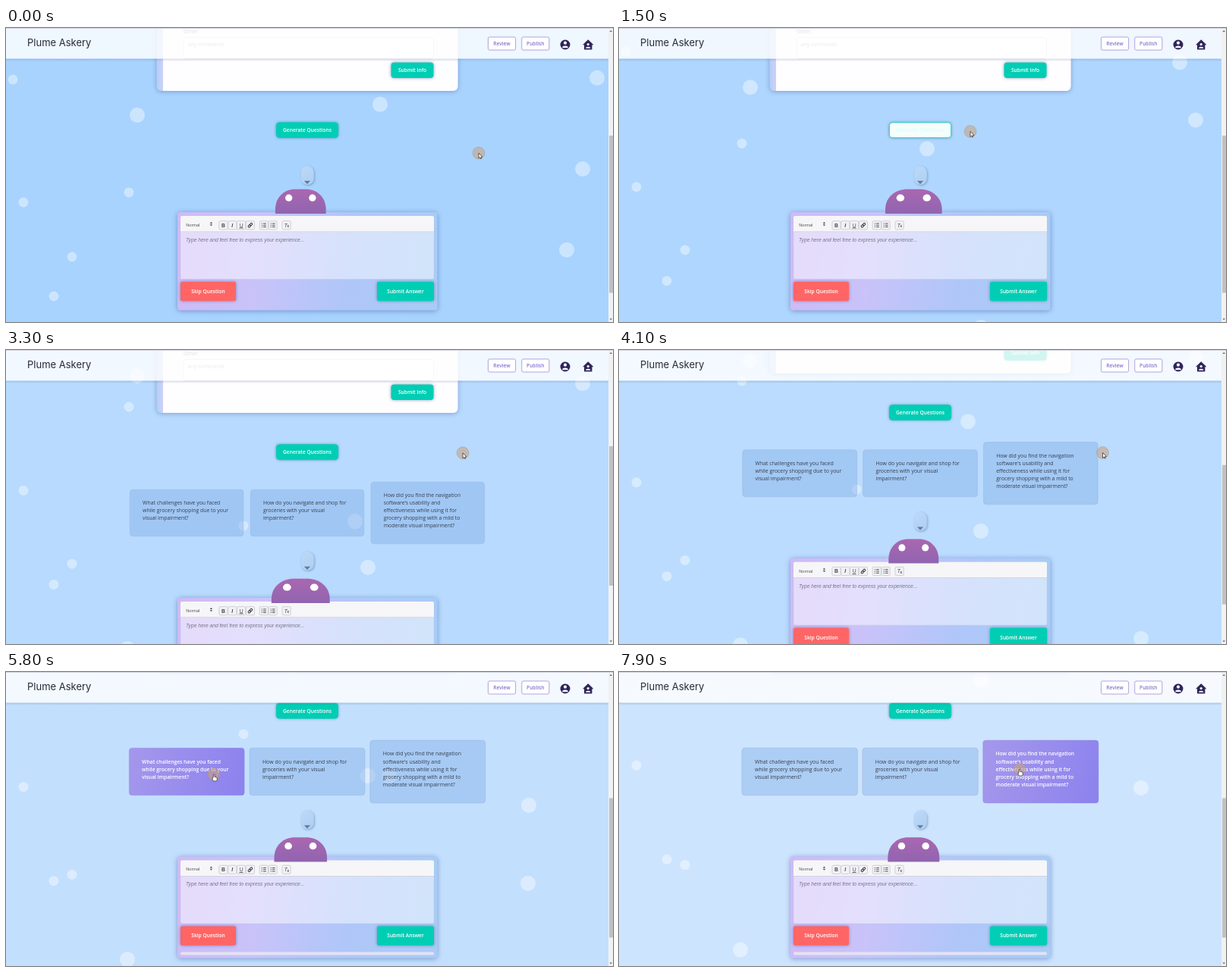
An HTML page with a canvas that plays this animation: 800 by 388 pixels, repeating every 8000 ms.

```html
<!DOCTYPE html>
<html lang="en">
<head>
<meta charset="utf-8">
<title>Survey page</title>
<style>
html, body { margin: 0; width: 100%; height: 100%; overflow: hidden; background: #b5d7fd; }
canvas { display: block; width: 800px; height: 388px; }
</style>
</head>
<body>
<canvas id="stage" width="800" height="388"></canvas>
<script>
const c = document.getElementById('stage').getContext('2d');
const LOOP = 8000, CLICK = 1000, ASK = 2600, SHIFT = 83.5, MID = 397;
const UI = '"Open Sans", "Noto Sans", sans-serif';
const ARIAL = '"Liberation Sans", Arial, sans-serif';
const TEAL = '#00ceb4', RED = '#ff6565', NAVY = '#30245a', PALE = '#f4f7fe', INK = '#444';

const clamp = v => Math.max(0, Math.min(1, v));
const span = (t, a, b) => {
  const v = clamp((t - a) / (b - a));
  return v * v * (3 - 2 * v);
};

// bubbles rise in layers, each with its own speed in px per second
const layers = [
  { speed: 165, spots: [[493, 101], [779, 66], [739, 293], [406, 407], [460, 771], [376, 950], [505, 1095], [689, 1133], [607, 1421]] },
  { speed: 60, spots: [[313, 430], [477, 485], [688, 627]] },
  { speed: 43, spots: [[760, 186], [162, 217]] },
  { speed: 24.5, spots: [[9, 68], [173, 115]] },
  { speed: 13.5, spots: [[23, 230], [63, 354]] },
  { speed: 6, spots: [[87, 302], [160, 414]] }
];
// the right half of the stage has the larger bubbles
const radius = x => x < 165 && x !== 160 || x === 313 ? 6.5 : 10;

// the pointer reaches each stop at the given time, after a glide of fixed length
const GLIDE = 600;
const stops = [
  [850, 416, 136], [1450, 463, 136.5], [3100, 589.5, 136], [3700, 637.5, 135.5],
  [5500, 274, 135], [6600, 392, 129], [7650, 528, 128]
];

const questions = [
  ['What challenges have you faced', 'while grocery shopping due to your', 'visual impairment?'],
  ['How do you navigate and shop for', 'groceries with your visual', 'impairment?'],
  ['How did you find the navigation', "software's usability and", 'effectiveness while using it for', 'grocery shopping with a mild to', 'moderate visual impairment?']
].map((lines, i) => ({ lines, x: MID + (i - 1) * 158.8, y: 215, w: 152.6, h: 32 + lines.length * 10.25 }));

function pointer(t) {
  let x = 623, y = 165;
  for (const [end, sx, sy] of stops) {
    const k = span(t, end - GLIDE, end);
    x += (sx - x) * k;
    y += (sy - y) * k;
  }
  return { x, y };
}
const scrollAt = t => SHIFT * span(t, 3750, 4350);

function inside(q, t) {
  if (t < ASK) return false;
  const p = pointer(t);
  return Math.abs(p.x - q.x) < q.w / 2 && Math.abs(p.y + scrollAt(t) - q.y) < q.h / 2;
}
// share of the last 200 ms spent over the card
function hover(q, t) {
  let n = 0;
  for (let i = 0; i < 10; i++) n += inside(q, t - i * 20);
  return n / 10;
}

function shadow(color, blur, x = 0, y = 0) {
  c.shadowColor = color;
  c.shadowBlur = blur;
  c.shadowOffsetX = x;
  c.shadowOffsetY = y;
}
const noShadow = () => shadow('transparent', 0);

function stroke(color, w) {
  c.strokeStyle = color;
  c.lineWidth = w;
  c.stroke();
}
function box(x, y, w, h, r, fill, edge, lw = .8) {
  c.beginPath();
  c.roundRect(x, y, w, h, r);
  if (fill) { c.fillStyle = fill; c.fill(); }
  noShadow();
  if (edge) stroke(edge, lw);
}
function oval(x, y, rx, ry, fill, from = 0) {
  c.beginPath();
  c.ellipse(x, y, rx, ry, 0, from, Math.PI * 2);
  c.fillStyle = fill;
  c.fill();
}
function triangle(x, y, half, h, fill) {
  c.beginPath();
  c.moveTo(x - half, y);
  c.lineTo(x + half, y);
  c.lineTo(x, y + h);
  c.fillStyle = fill;
  c.fill();
}
function rule(x, y, w, color, lw = .9) {
  c.fillStyle = color;
  c.fillRect(x, y - lw / 2, w, lw);
}
function text(s, x, y, font, color, align = 'left') {
  c.font = font;
  c.fillStyle = color;
  c.textAlign = align;
  c.fillText(s, x, y);
}
function ramp(x0, y0, x1, y1, ...colors) {
  const g = c.createLinearGradient(x0, y0, x1, y1);
  colors.forEach((v, i) => g.addColorStop(i / (colors.length - 1), v));
  return g;
}
function button(label, x, y, w, h, fill, r = 4, ink = '#fff', edge) {
  shadow('rgba(40,70,120,.5)', 4);
  box(x, y, w, h, r, fill, edge);
  text(label, x + w / 2, y + h / 2 + 2.3, '600 6.65px ' + UI, ink, 'center');
}

function background(t) {
  const k = t / LOOP;
  c.fillStyle = `rgb(${168 + 37 * k},${211 + 17 * k},254)`;
  c.fillRect(0, 0, 800, 388);
  for (const { speed, spots } of layers)
    for (const [x, y] of spots)
      oval(x, y - speed * t / 1000, radius(x), radius(x), 'rgba(255,255,255,.42)');
}

function infoCard(s) {
  shadow('rgba(70,100,170,.5)', 6, 0, 1);
  box(198.5, -20 - s, 397, 103, 6, ramp(198, 0, 208, 0, '#b4cdf6', '#cfd2f8'));
  box(207, -20 - s, 388.5, 103, [0, 6, 6, 0], '#fefdff');
  text('Other', 234, 7 - s, '7px ' + UI, '#555');
  box(234, 12.5 - s, 329.5, 27.5, 3, '#fefefe', '#c9c9d2');
  text('any comments', 239.5, 23.5 - s, '7px ' + UI, '#8a8a92');
  button('Submit Info', 507.5, 45.5 - s, 56, 20.5, TEAL);
}

function generate(t, s) {
  const busy = span(t, CLICK, CLICK + 300) * (1 - span(t, ASK, ASK + 250));
  const white = `rgb(${245 * busy},${206 + 47 * busy},${180 + 73 * busy})`;
  const ink = `rgb(${255 - 40 * busy},255,${255 - 8 * busy})`;
  button('Generate Questions', 356.3, 124.8 - s, 81.4, 20, white, 4, ink, TEAL);
}

function card(q, t, s) {
  const { w, h } = q, over = hover(q, t), shown = clamp((t - ASK) / 300);
  const scale = 1 - .02 * Math.exp(-(t - 3300) / 1500);
  const mix = a => a + (255 - a) * over;
  c.save();
  c.translate(q.x, q.y - s);
  c.scale(scale, scale);
  c.globalAlpha = shown;
  box(-w / 2, -h / 2, w, h, 4, 'rgba(132,175,231,.45)', 'rgba(150,165,205,.4)');
  c.globalAlpha = shown * over;
  box(-w / 2, -h / 2, w, h, 4, ramp(-w / 2, 0, w / 2, h / 2, '#a396ec', '#8c82ee'));
  c.globalAlpha = shown;
  q.lines.forEach((l, i) => text(l, 17 - w / 2, 20.5 - h / 2 + i * 10.25,
    (over > .5 ? '600 6.75px ' : '7px ') + UI, `rgb(${mix(55)},${mix(62)},${mix(78)})`));
  c.restore();
}

function toolbar(y) {
  const my = y + 12.3, step = 11.8;
  const tool = x => box(x - 5.6, my - 5.6, 11.2, 11.2, 1.5, '#f2f2f6', '#c6c6d0');
  box(230, y, 334, 21, [2, 2, 0, 0], '#f6f6f8');
  rule(230, y + 21, 334, '#cfcfd8');
  text('Normal', 237.3, my + 1.5, '5.6px ' + ARIAL, '#555');
  triangle(270.4, my - 2.2, 1.7, -2, INK);
  triangle(270.4, my - 1, 1.7, 2, INK);
  ['bold', 'italic bold', ''].forEach((style, i) => {
    tool(286.5 + i * step);
    text('BIU'[i], 286.5 + i * step, my + 2.4, style + ' 6.8px ' + ARIAL, INK, 'center');
  });
  rule(307.5, my + 3.6, 5, INK);
  tool(321.9);
  c.save();
  c.translate(321.9, my);
  c.rotate(-Math.PI / 4);
  for (const x of [-3.4, -.2]) box(x, -1.3, 3.6, 2.6, 1.3, null, INK, 1.1);
  c.restore();
  for (const x of [339.8, 339.8 + step]) {
    tool(x);
    for (const d of [-2.3, 0, 2.3]) {
      rule(x - 3, my + d, 1.2, INK);
      rule(x - .8, my + d, 3.8, INK);
    }
  }
  tool(369.6);
  text('T', 368.8, my + 2.3, 'italic 6.6px ' + ARIAL, INK, 'center');
  text('x', 371.8, my + 3, 'bold 4.5px ' + ARIAL, INK, 'center');
}

function panel(y, asked) {
  shadow('rgba(60,90,165,.55)', 7, 0, 1);
  box(226, y, 342.5, asked ? 134 : 129.5, 4,
    ramp(226, y, 568, y + 50, '#cfbaf6', '#c8c3f9', '#b0c6f9', '#a8ccf5'));
  toolbar(y + 5);
  box(230, y + 26, 334, 62.5, [0, 0, 2, 2], 'rgba(255,255,255,.47)', 'rgba(190,195,225,.4)');
  text('Type here and feel free to express your experience...', 237, y + 38.8, 'italic 6.7px ' + ARIAL, '#75758a');
  button('Skip Question', 230, y + 92, 73, 25.3, RED, 2);
  button('Submit Answer', 489, y + 92, 75, 25.3, TEAL, 2);
  if (asked) box(230, y + 126, 334, 4, 2, '#e4e2f3');
}

function robot(t, y) {
  const half = 35.75 - 2.85 * Math.cos(Math.PI * (t / 1000 - .19));
  c.save();
  c.translate(388.3, y);
  c.scale(half / 33, 1);
  c.beginPath();
  c.moveTo(-33, 32.2);
  c.lineTo(-33, 27);
  c.bezierCurveTo(-33, 10, -21, 0, -7, 0);
  c.lineTo(7, 0);
  c.bezierCurveTo(21, 0, 33, 10, 33, 27);
  c.lineTo(33, 32.2);
  c.fillStyle = ramp(0, 0, 0, 33, '#aa67b0', '#9064b0');
  c.fill();
  for (const side of [-1, 1]) oval(side * 15.4, 11.5, 4.6, 4.6, '#fff');
  c.restore();
}

function bulb(y) {
  shadow('rgba(70,105,160,.5)', 3, 1, 1);
  box(388.8, y, 17, 25, 8.5, ramp(388, y, 406, y + 25, '#bcd9f9', '#aecff1'));
  triangle(MID, y + 19.8, 4.1, 4.2, '#64799a');
}

// small head and shoulders
function person(x, y, size) {
  oval(x, y - 2.3 * size, 2.1 * size, 2.1 * size, PALE);
  oval(x, y + 4.2 * size, 3.9 * size, 2.6 * size, PALE, Math.PI);
}

function header() {
  const shade = ramp(0, 40.5, 0, 44, 'rgba(70,100,160,.25)', 'rgba(70,100,160,0)');
  c.fillStyle = shade;
  c.fillRect(0, 40.5, 794, 4);
  c.fillStyle = 'rgba(255,255,255,.82)';
  c.fillRect(0, 0, 794, 40.5);
  rule(0, .5, 800, '#d3d5de', 1);
  text('Plume Askery', 28, 23.8, '13px Inter, sans-serif', '#292a35');
  ['Review', 'Publish'].forEach((label, i) => {
    const x = 635.5 + i * 44.3;
    shadow('rgba(120,100,200,.35)', 2);
    box(x, 12, 36, 17, 2, '#fff', '#a99ade');
    text(label, x + 18, 22.8, '600 6.6px ' + UI, '#8474cf', 'center');
  });
  oval(737, 22, 6.5, 6.5, NAVY);
  person(737, 22, 1);
  triangle(767.2, 22.3, 7.2, -7, NAVY);
  box(762, 21.5, 10.4, 7, .5, NAVY);
  person(767.2, 23.4, .8);
}

function scrollbar(asked, s) {
  c.fillStyle = '#f1f1f2';
  c.fillRect(794, 1, 6, 387);
  c.fillStyle = '#c1c1c3';
  c.fillRect(795, asked ? 127 + s / SHIFT * 39.5 : 142, 5, asked ? 184 : 207.5);
  triangle(797.2, 5, 1.8, -2, '#666');
  triangle(797.2, 383.5, 1.8, 2, '#666');
}

function cursor(t, s, asked) {
  const { x, y } = pointer(t);
  oval(x, y, 8, 8, 'rgba(200,162,125,.58)');
  stroke('rgba(170,135,110,.45)', .7);
  const onButton = !asked && t < CLICK + 150 && Math.abs(x - MID) < 41 && Math.abs(y - 134.5 + s) < 10;
  if (onButton || questions.some(q => inside(q, t))) {
    box(x - .7, y, 1.8, 6, .9, '#fff', '#3c3535');
    box(x - 1.8, y + 3.6, 6, 5.4, 1.8, '#fff', '#3c3535');
    rule(x - .3, y + 3.6, 1, '#fff', 1.2);
    return;
  }
  c.beginPath();
  c.moveTo(x, y);
  c.lineTo(x, y + 7);
  c.lineTo(x + 1.7, y + 5.6);
  c.lineTo(x + 3.2, y + 7.8);
  c.lineTo(x + 3, y + 5.2);
  c.lineTo(x + 4.8, y + 5);
  c.closePath();
  c.fillStyle = '#fff';
  c.fill();
  stroke('#3c3535', .8);
}

function draw(t) {
  const asked = t >= ASK, s = scrollAt(t);
  const drop = (asked ? 84 : 0) - s;
  background(t);
  infoCard(s);
  generate(t, s);
  if (asked) questions.forEach(q => card(q, t, s));
  panel(243 + drop, asked);
  robot(t, 212.7 + drop + (asked ? 5 : 0));
  bulb(182 + drop);
  header();
  scrollbar(asked, s);
  cursor(t, s, asked);
}

function frame(now) {
  draw(now % LOOP);
  requestAnimationFrame(frame);
}
draw(0);
requestAnimationFrame(frame);
</script>
</body>
</html>
```
